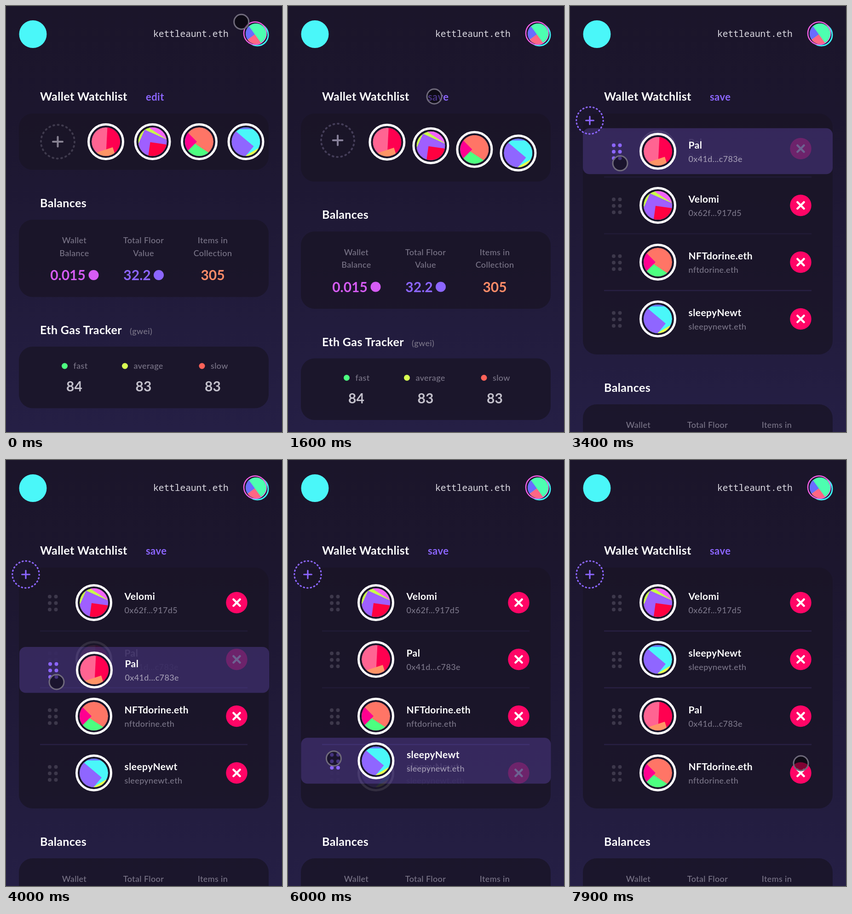
An HTML page that plays this animation: 600x923 px, repeating every 8 s.

```html
<!DOCTYPE html>
<html lang="en">
<head>
<meta charset="utf-8">
<title>Wallet watchlist</title>
<style>
  html, body { margin: 0; width: 100%; height: 100%; overflow: hidden; background: #1e1834; }
  svg { display: block; width: 100vw; height: 100vh; }
  text { font-family: Lato, "Open Sans", sans-serif; letter-spacing: .02em; fill: #fff; }
  .title { font-size: 25px; font-weight: 700; letter-spacing: .015em; }
  .link { font-size: 22px; font-weight: 700; fill: #8c66ff; }
  .label { font-size: 18px; font-weight: 500; fill: #7a7588; }
  .num { font-size: 30px; font-weight: 700; letter-spacing: 0; }
  .name { font-size: 21px; font-weight: 700; }
  .mono { font: 300 19.5px "Noto Sans Mono", monospace; letter-spacing: 0; fill: #dcdae2; }
  .mid { text-anchor: middle; }
  .card { fill: #191426; fill-opacity: .8; }
  .grip { fill: #3d384b; }
  .lifted .label { fill: #a19ab3; }
  .lifted .grip { fill: #8c66ff; }
</style>
</head>
<body>
<svg id="stage" viewBox="0 0 600 923" preserveAspectRatio="none">
  <defs>
    <linearGradient id="sky" x2="0" y2="1">
      <stop stop-color="#1b152a"/><stop offset=".25" stop-color="#1c162e"/><stop offset="1" stop-color="#251f45"/>
    </linearGradient>
    <clipPath id="disc"><circle r="31"/></clipPath>
    <clipPath id="smallDisc"><circle r="22.5"/></clipPath>
  </defs>
  <rect width="600" height="923" fill="url(#sky)"/>
</svg>
<script>
const NS = 'http://www.w3.org/2000/svg';
const LOOP = 8000;
const PURPLE = '#8c66ff';
const stage = document.getElementById('stage');

function set(el, attrs) {
  for (const k in attrs) el.setAttribute(k, attrs[k]);
}
function add(parent, tag, attrs = {}, text) {
  const el = document.createElementNS(NS, tag);
  set(el, attrs);
  if (text !== undefined) el.textContent = text;
  return parent.appendChild(el);
}
const group = (parent, attrs) => add(parent, 'g', attrs);
const label = (parent, cls, x, y, str, fill) =>
  add(parent, 'text', { class: cls, x, y, ...(fill && { style: `fill:${fill}` }) }, str);
const dot = (parent, cx, cy, r, fill) => add(parent, 'circle', { cx, cy, r, fill });
const circle = (parent, cx, cy, r, stroke, width, fill = 'none') =>
  add(parent, 'circle', { cx, cy, r, stroke, 'stroke-width': width, fill });
const card = (parent, y, height) =>
  add(parent, 'rect', { class: 'card', x: 28, y, width: 543, height, rx: 30 });
const move = (el, x, y, s = 1) => el.setAttribute('transform', `translate(${x} ${y}) scale(${s})`);

const mix = (a, b, k) => a + (b - a) * k;
const clamp = k => Math.max(0, Math.min(1, k));
const ease = k => k < .5 ? 4 * k ** 3 : 1 - (2 - 2 * k) ** 3 / 2;
const phase = (t, start, length) => ease(clamp((t - start) / length));

const column = i => 148.5 + 150.5 * i;
const rowY = slot => 309 + 123 * slot;

// Avatars: a base colour under tilted squares, each given by colour, corner and angle.
const ART = [
  ['#ff6492', ['#ff0050', 0, 35, -87], ['#ff9466', 15, 12, 72]],
  ['#c9ff4a', ['#f263f8', -15, -35, -57], ['#9f5fff', -17, -26, 24], ['#ff0040', -5, 1, 8]],
  ['#ff7566', ['#4dff80', -30, -9, 33], ['#ff0090', -5, 0, 135]],
  ['#4af7f9', ['#6a78ff', -40, -27, -90], ['#e6ff4d', -23, 43, -30], ['#8f66ff', 17, 10, 130]]
];
const OWNER = ['#4dffb0', ['#6a6cff', -2.5, 1.5, 144], ['#ff6685', -2.5, 1.5, 54]];

function paint(parent, [base, ...squares], r) {
  dot(parent, 0, 0, r, base);
  for (const [fill, x, y, angle] of squares)
    add(parent, 'rect', { fill, width: 90, height: 90, transform: `translate(${x} ${y}) rotate(${angle})` });
}
function avatar(parent, art) {
  const g = group(parent);
  circle(g, 0, 0, 37.5, '#fff', 5, '#1a152a');
  paint(group(g, { 'clip-path': 'url(#disc)' }), art, 31);
  return g;
}
function grips(parent) {
  for (let i = 0; i < 6; i++)
    add(parent, 'circle', { class: 'grip', cx: 95 + 13.5 * (i % 2), cy: 14 * (i >> 1) - 13, r: 4 });
}
function caption(parent, { name, addr }) {
  label(parent, 'name', 257.5, -6, name);
  label(parent, 'label', 257.5, 23, addr);
}

// Header
dot(stage, 58.5, 61, 30, '#4af7f9');
label(stage, 'mono', 320, 67, 'kettleaunt.eth');
circle(stage, 546.5, 62.5, 23.5, '#3df0f5', 3);
circle(stage, 541.5, 59, 24.5, '#f45fe6', 2.5, '#1a152a');
paint(group(stage, { transform: 'translate(543.5 60)', 'clip-path': 'url(#smallDisc)' }), OWNER, 22.5);

// Sections below the watchlist
const lower = group(stage);
label(lower, 'title', 74, 435.5, 'Balances');
card(lower, 463, 167.5);
['Wallet Balance', 'Total-Floor Value', 'Items-in Collection'].forEach((words, i) =>
  words.split(' ').forEach((word, line) =>
    label(lower, 'label mid', column(i), 514 + 27.5 * line, word.replace('-', ' '))));
[['0.015', '#d65cf4', -14], ['32.2', PURPLE, -14], ['305', '#ff8c68', 0]].forEach(([value, color, shift], i) => {
  label(lower, 'num mid', column(i) + shift, 594, value, color);
  if (shift) dot(lower, column(i) + 42 - 9 * i, 583, 11, color);
});
label(lower, 'title', 74, 711, 'Eth Gas Tracker');
label(lower, 'label', 269, 711, '(gwei)');
card(lower, 738, 133.5);
[['fast', '#4dff80', 127.5, 84], ['average', '#d9ff52', 258.5, 83], ['slow', '#ff6259', 426, 83]]
  .forEach(([word, color, x, value], i) => {
    dot(lower, x, 780, 6.5, color);
    label(lower, 'label', x + 19, 786, word);
    label(lower, 'num mid', column(i), 835, value, '#c3c0cb');
  });

// Watchlist
label(stage, 'title', 74, 205, 'Wallet Watchlist');
const editLink = label(stage, 'link', 304, 205, 'edit');
const watch = card(stage, 233, 122);

const plus = group(stage, { fill: 'none', 'stroke-width': 4, 'stroke-linecap': 'round' });
const plusRing = add(plus, 'circle', { r: 36.5, pathLength: 24, 'stroke-dasharray': '.2 .8' });
const plusSign = add(plus, 'path', { d: 'M-10.5 0H10.5M0 -10.5V10.5' });

const dividers = [0, 1, 2].map(i =>
  add(stage, 'path', { d: `M74 ${rowY(i + .5)}H525`, stroke: '#282143', 'stroke-width': 2.5 }));

const items = [
  { name: 'Pal', addr: '0x41d...c783e' },
  { name: 'Velomi', addr: '0x62f...917d5' },
  { name: 'NFTdorine.eth', addr: 'nftdorine.eth' },
  { name: 'sleepyNewt', addr: 'sleepynewt.eth' }
];
// Item moved, its slots, grab and drop times, and where the panel is held.
const drags = [
  { item: 0, from: 0, to: 1, grab: 3250, drop: 4400, x: 1, y: 455 },
  { item: 3, from: 3, to: 1, grab: 5800, drop: 6600, x: 4, y: 401 }
];

items.forEach((item, i) => {
  item.row = group(stage);
  item.info = group(item.row);
  grips(item.info);
  caption(item.info, item);
  item.close = group(item.row, { transform: 'translate(501.5 0)' });
  dot(item.close, 0, 0, 23.2, '#ff0566');
  add(item.close, 'path', { d: 'M-7 -7L7 7M7 -7L-7 7', stroke: '#fff', 'stroke-width': 4.5, 'stroke-linecap': 'round' });
  item.pic = avatar(stage, ART[i]);
});
for (const drag of drags) {
  drag.panel = group(stage, { class: 'lifted' });
  add(drag.panel, 'rect', { x: 28, y: -50, width: 543, height: 99.5, rx: 14, fill: PURPLE, 'fill-opacity': .24 });
  grips(drag.panel);
  move(avatar(drag.panel, ART[drag.item]), 191, 0);
  caption(drag.panel, items[drag.item]);
}

// Pointer with its click ring
const pointer = group(stage);
const ring = group(pointer);
circle(ring, 0, 0, 33, '#0b0716', 3);
for (const r of [31.6, 34.4]) circle(ring, 0, 0, r, '#e8e6ec', 1);
circle(pointer, 0, 0, 16, '#6f6a7b', 3, 'rgba(0, 0, 0, .5)');

const HOME = [512, 34];
const MOVES = [
  [-50, 318, 196], [2190, 109, 335], [3250, 110, 481],
  [4600, 99, 674], [5800, 103, 385], [7150, 502, 657]
];
const GLIDE = 700;
const CLICKS = [1050, ...drags.flatMap(d => [d.grab - 350, d.drop - 300])];

// Rows passed by a dragged panel step aside; the dragged row's gap follows.
function arrange(t) {
  const slots = items.map((_, i) => i);
  const lifts = items.map(() => 0);
  for (const { item, from, to, grab, drop, x, y, panel } of drags) {
    const out = phase(t, grab, GLIDE), back = phase(t, drop, 200);
    const lift = phase(t, grab - 250, 200) - back;
    const at = mix(mix(rowY(from), y, out), rowY(to), back);
    const pos = (at - rowY(0)) / 123;
    const dir = Math.sign(to - from);
    slots.forEach((slot, i) => {
      if (i === item || (slot - from) * dir < 0) return;
      const passed = clamp(2.5 * ((pos - slot) * dir + .5));
      slots[i] -= dir * passed;
      slots[item] += dir * passed;
    });
    lifts[item] = Math.max(lifts[item], lift);
    move(panel, x * (out - back), at);
    set(panel, { opacity: lift });
  }
  return { slots, lifts };
}

function draw(t) {
  const open = phase(t, 1450, 600);
  const shown = clamp(open * 2 - 1);

  move(lower, 0, 400 * open);
  watch.setAttribute('height', mix(122, 522, open));
  editLink.textContent = t < 1450 ? 'edit' : 'save';
  move(plus, mix(112.5, 43, open), mix(294, 248, open), mix(1, .8, open));
  const tint = grey => `color-mix(in srgb, ${PURPLE} ${100 * open}%, ${grey})`;
  plusRing.style.stroke = tint('#3f3a4d');
  plusSign.style.stroke = tint('#878292');

  const { slots, lifts } = arrange(t);
  items.forEach((item, i) => {
    const y = rowY(slots[i]);
    const ghost = mix(1, .1, lifts[i]);
    move(item.row, 0, y);
    set(item.info, { opacity: shown * ghost });
    set(item.close, { opacity: shown * mix(1, .32, lifts[i]) });
    move(item.pic, mix(217 + 101.5 * i, 191, open), mix(294, y, open));
    set(item.pic, { opacity: ghost });
  });
  const held = Math.max(...lifts);
  dividers.forEach((line, i) => set(line, { opacity: shown * (i < 2 ? mix(1, .55, held) : 1) }));

  const [px, py] = MOVES.reduce(([x, y], [start, toX, toY]) => {
    const k = phase(t, start, GLIDE);
    return [mix(x, toX, k), mix(y, toY, k)];
  }, HOME);
  move(pointer, px, py);

  const age = t - CLICKS.filter(c => c <= t).pop();
  move(ring, 0, 0, mix(.5, 1, clamp(age / 200)));
  set(ring, { opacity: clamp((450 - age) / 100) || 0 });
}

const born = performance.now();
function tick() {
  draw((performance.now() - born) % LOOP);
  requestAnimationFrame(tick);
}
tick();
</script>
</body>
</html>
```
